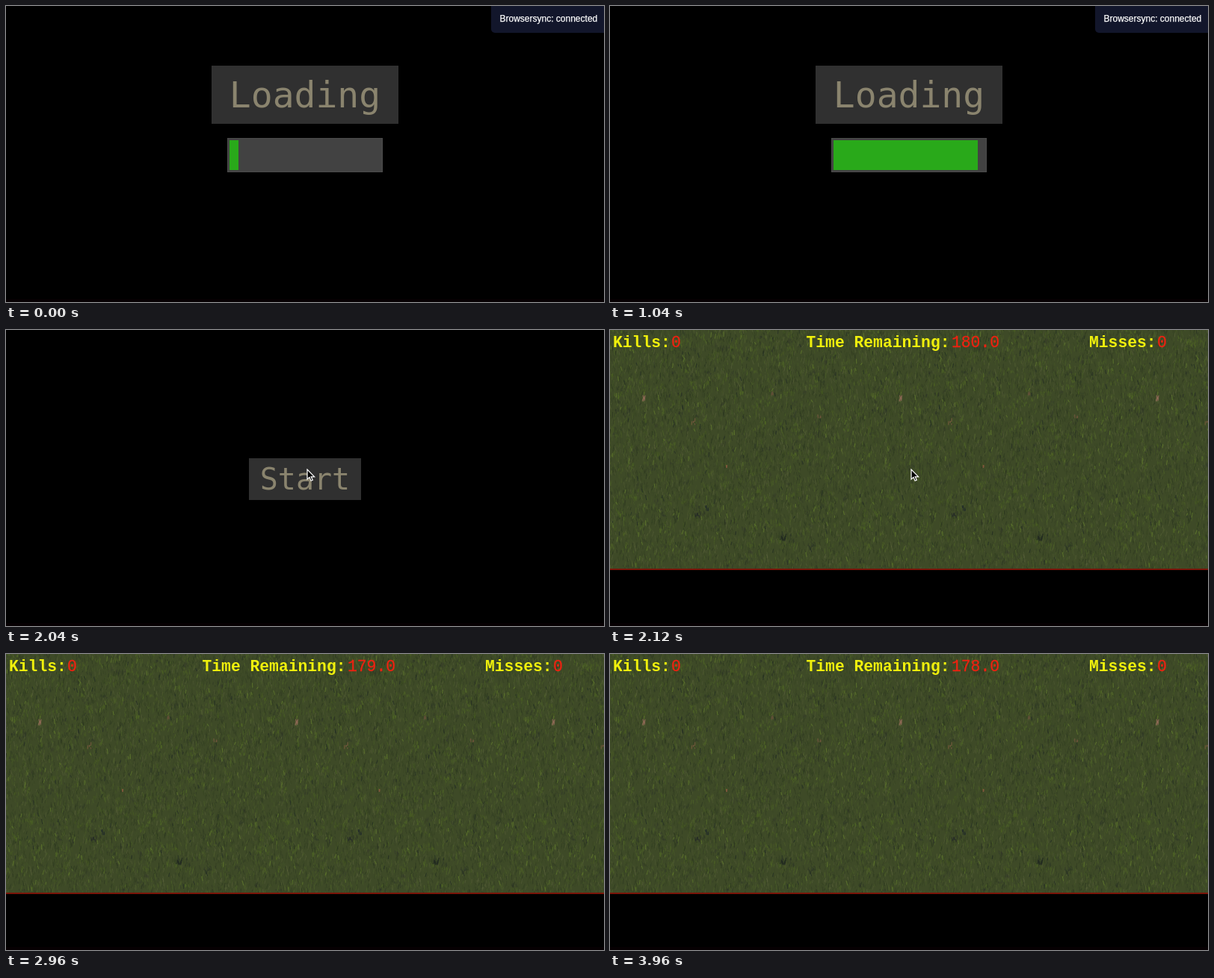
Animation, 800 px wide and 397 px high, one loop 4 s. Source, as an HTML page with a canvas:

```html
<!DOCTYPE html>
<html lang="en">
<head>
<meta charset="utf-8">
<title>Loading, start and play</title>
<style>
  html, body { margin: 0; width: 100%; height: 100%; overflow: hidden; background: #000; }
  #stage { position: relative; width: 800px; height: 397px; overflow: hidden; background: #000; }
  #stage * { position: absolute; box-sizing: border-box; white-space: pre; }
  .scene { inset: 0; }
  .floor { left: 0; top: 393px; width: 800px; height: 4px; background: #060002; }

  .label {
    background: #303030; color: #8a846e; text-align: center;
    font-family: "DejaVu Sans Mono", monospace;
  }
  .title { left: 275px; top: 80px; width: 250px; height: 78px; font-size: 48px; line-height: 78px; }
  .start { left: 325px; top: 172px; width: 150px; height: 56px; font-size: 40px; line-height: 56px; }
  .track {
    left: 296px; top: 177px; width: 208px; height: 46px;
    background: #424242; border: 1px solid #4b4b4b;
  }
  .fill { left: 2px; top: 2px; height: 40px; background: #29a91a; }

  .notice {
    left: 649px; top: 0; width: 151px; height: 36px; padding-left: 11.5px;
    background: #12162b; color: #fff; border-bottom-left-radius: 5px;
    font: 12px/35px "Liberation Sans", Arial, sans-serif;
    -webkit-text-stroke: .25px #fff;
  }

  .edge { left: 0; top: 320px; width: 800px; height: 2px; background: #791509; }
  .hud { top: 5px; font: bold 21.333px/24px "Courier New", "Liberation Mono", monospace; color: #f0f00c; }
  .num { font-weight: normal; color: #ee2211; -webkit-text-stroke: .3px #ee2211; }
  .cursor { left: -1px; top: -1px; width: 14px; height: 19px; }

  .loading { animation: loading 4s step-end infinite; }
  .ready { animation: ready 4s step-end infinite; }
  .game { animation: game 4s step-end infinite; }
  .notice { animation: notice 4s step-end infinite; }
  .fill { animation: fill 4s linear infinite; }
  .pointer { animation: pointer 4s step-end infinite; }
  .cursor { animation: move 4s linear infinite; }

  @keyframes loading { 0% { visibility: visible } 27.8%, 100% { visibility: hidden } }
  @keyframes ready { 0%, 52.8%, 100% { visibility: hidden } 27.8% { visibility: visible } }
  @keyframes game { 0% { visibility: hidden } 52.8%, 100% { visibility: visible } }
  @keyframes notice { 0% { visibility: visible } 41%, 100% { visibility: hidden } }
  @keyframes pointer { 0%, 63%, 100% { visibility: hidden } 36.8% { visibility: visible } }
  @keyframes fill { 0% { width: 11.5px } 16% { width: 106px } 27%, 100% { width: 202px } }
  @keyframes move {
    0%, 37% { transform: translate(115px, 394px); animation-timing-function: cubic-bezier(.3, .2, .4, 1) }
    45%, 100% { transform: translate(403px, 187px) }
  }
</style>
</head>
<body>
<div id="stage">
  <div class="floor"></div>
  <div class="scene loading">
    <div class="label title">Loading</div>
    <div class="track"><div class="fill"></div></div>
  </div>
  <div class="scene ready"><div class="label start">Start</div></div>
  <div class="scene game">
    <canvas id="grass" width="800" height="320" style="left:0;top:0"></canvas>
    <div class="edge"></div>
    <span class="hud" style="left:4px">Kills:</span>
    <span class="hud num" style="left:82px">0</span>
    <span class="hud" style="left:262.5px">Time Remaining:</span>
    <span class="hud num" id="clock" style="left:457px">180.0</span>
    <span class="hud" style="left:641px">Misses:</span>
    <span class="hud num" style="left:732px">0</span>
  </div>
  <div class="notice">Browsersync: connected</div>
  <div class="scene pointer">
    <svg class="cursor" viewBox="-1 -1 14 19">
      <path d="M0 0V13.2L3 10.6L5.1 15.3L7.3 14.3L5.2 9.8H9.6Z" fill="#000" stroke="#fff" stroke-width="1.2"/>
    </svg>
  </div>
</div>
<script>
  const LOOP = 4000, TILE = 343.5;
  const ctx = document.getElementById('grass').getContext('2d');
  const clock = document.getElementById('clock');

  let seed = 7;
  const rand = () => (seed = (seed * 16807) % 2147483647) / 2147483647;
  const range = (a, b) => a + (b - a) * rand();
  const pick = list => list[Math.floor(rand() * list.length)];

  // One stroke, repeated with the width of the ground tile.
  function blade(x, y, lean, len, color, width = 1) {
    ctx.strokeStyle = color;
    ctx.lineWidth = width;
    ctx.beginPath();
    for (let ox = -TILE; ox < 800; ox += TILE) {
      ctx.moveTo(x + ox, y);
      ctx.lineTo(x + ox + lean, y - len);
    }
    ctx.stroke();
  }

  function clump(x, y, w, h, count, color) {
    for (let i = 0; i < count; i++) {
      blade(x + range(-w, w), y + range(-h, h), range(-1, 1), range(2, 5), color, 1.4);
    }
  }

  function drawGrass() {
    ctx.fillStyle = '#3e4a27';
    ctx.fillRect(0, 0, 800, 320);
    const tones = ['#26311d', '#2f3a21', '#364422', '#485a28', '#546b29', '#5b633c'];
    for (let i = 0; i < 8000; i++) {
      ctx.globalAlpha = range(.25, .6);
      blade(range(0, TILE), range(0, 328), range(-2, 2), range(3, 8), pick(tones));
    }
    // Small tufts break up the even ground.
    for (let i = 0; i < 420; i++) {
      ctx.globalAlpha = range(.2, .45);
      clump(range(0, TILE), range(0, 325), 4, 3, 5, pick(['#2a3127', '#343a2b', '#566f27', '#4d6324']));
    }
    ctx.globalAlpha = .6;
    for (let i = 0; i < 220; i++) {
      blade(range(0, TILE), range(0, 320), range(-2, 2), range(3, 7), rand() < .6 ? '#68832f' : '#1f2924', 1.2);
    }
    ctx.globalAlpha = .75;
    clump(45, 94, 1.5, 3, 9, '#8d6a55');
    clump(112, 125, 3, 3, 5, '#75573f');
    clump(155, 185, 1.5, 1, 3, '#85583f');
    clump(280, 118, 2, 1.5, 3, '#75573f');
    clump(217, 87, 2, 2, 4, '#66503a');
    clump(232, 280, 4, 3, 14, '#222a20');
    clump(117, 251, 3, 3, 8, '#272d27');
    clump(130, 240, 2, 3, 7, '#222b2a');
    ctx.globalAlpha = 1;
  }

  function seconds(t) {
    if (t < 2120) return 180;
    return t < 2960 ? 179 + (2960 - t) / 840 : 179 - (t - 2960) / 1000;
  }

  function tick() {
    clock.textContent = seconds(performance.now() % LOOP).toFixed(1);
    requestAnimationFrame(tick);
  }

  drawGrass();
  tick();
</script>
</body>
</html>
```
